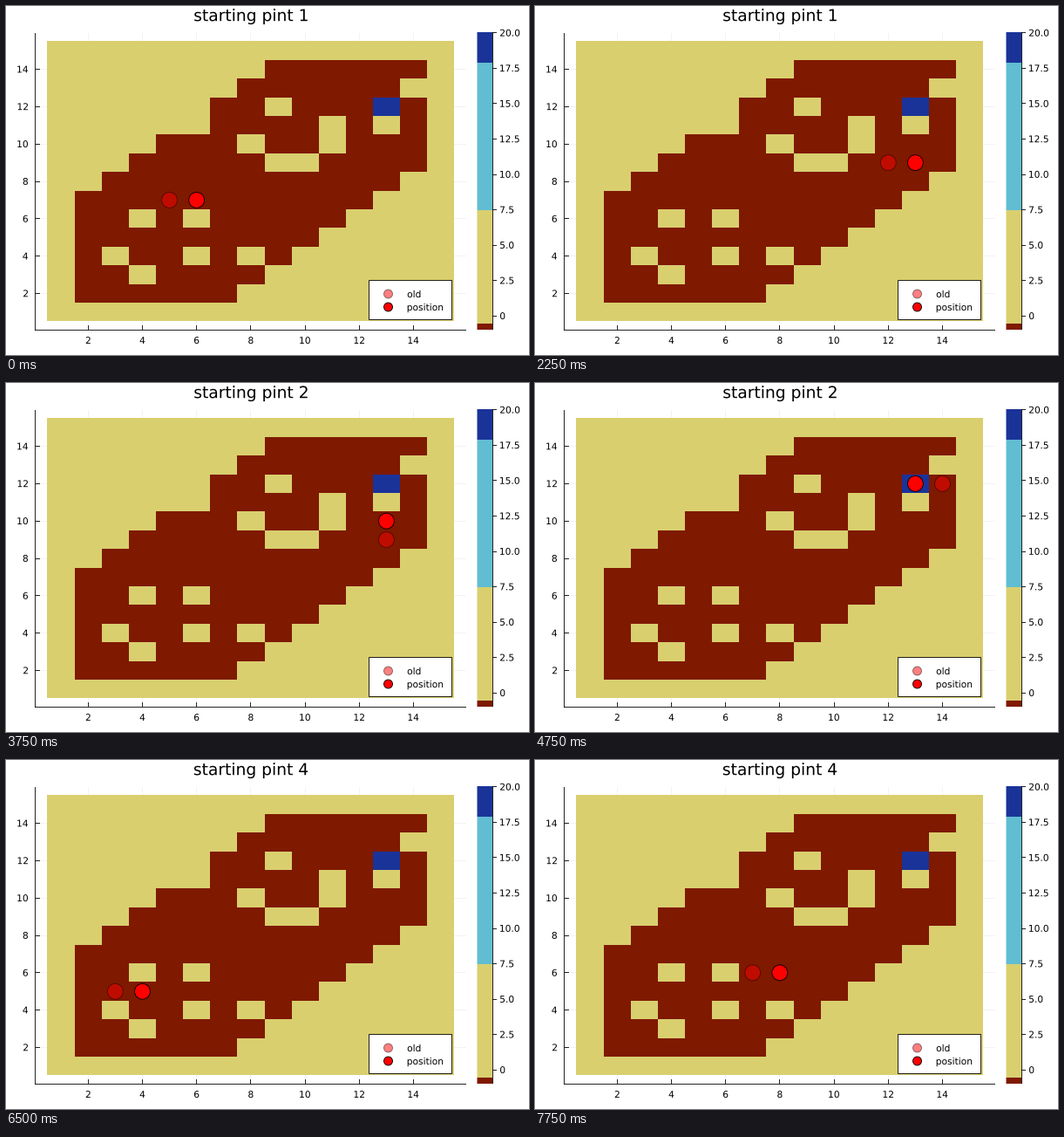
A matplotlib script that plays this animation: 600 px wide and 400 px high, repeating every 8000 ms.

```python
from math import floor

import matplotlib.pyplot as plt
from matplotlib.animation import FuncAnimation
from matplotlib.patches import Circle, PathPatch, Rectangle
from matplotlib.textpath import TextPath
from matplotlib.transforms import Affine2D

W, H, DPI = 600, 400, 100
PX = 72 / DPI  # points per pixel
BROWN, TAN, CYAN, BLUE = "#7f1900", "#d9cf6e", "#61bdd2", "#1a3399"
SMALL, LARGE = 10.67, 18.67
THIN = 0.85

# row: (first open column, last open column, walls between them)
ROWS = {
    2: (2, 7, ()), 3: (2, 8, (4,)), 4: (2, 9, (3, 6, 8)), 5: (2, 10, ()),
    6: (2, 11, (4, 6)), 7: (2, 12, ()), 8: (3, 13, ()), 9: (4, 14, (9, 10)),
    10: (5, 14, (8, 11)), 11: (7, 14, (11, 13)), 12: (7, 14, (9,)),
    13: (8, 13, ()), 14: (9, 14, ()),
}
GOAL = (13, 12)

# start cell and the moves of each run
RUNS = [
    ((5, 7), "RRRRRRRUURURUUL"),
    ((13, 9), "URUUL"),
    ((11, 13), "RRD"),
    ((2, 3), "UURRRRRUR"),
]
STEP = {"R": (1, 0), "L": (-1, 0), "U": (0, 1), "D": (0, -1)}

plt.rcParams["font.family"] = "DejaVu Sans"
fig = plt.figure(figsize=(W / DPI, H / DPI), dpi=DPI, facecolor="white")
ax = fig.add_axes([0, 0, 1, 1])
ax.set_xlim(0, W)
ax.set_ylim(H, 0)
ax.axis("off")


def cell_x(x):
    return 47.6 + 31.1 * (x - 0.5)


def cell_y(y):
    return 361.6 - 21.41 * (y - 0.5)


def edge_x(k):
    return round(47.4 + 31.138 * k)


def edge_y(k):
    return round(361.4 - 21.4 * k)


def middle(v):
    return floor(v) + 0.5


def box(x0, y0, x1, y1, color, **kw):
    kw = {"lw": 0, "snap": False, **kw}
    ax.add_patch(Rectangle((x0, y0), x1 - x0, y1 - y0, fc=color, **kw))


def cells(x0, x1, y0, y1, color):
    box(edge_x(x0 - 1), edge_y(y1), edge_x(x1), edge_y(y0 - 1), color, zorder=2)


def line(x0, y0, x1, y1, color="black", zorder=3):
    ax.plot([x0, x1], [y0, y1], color=color, lw=THIN * PX, zorder=zorder,
            solid_capstyle="butt", snap=False)


def text_path(x, y, text, size, align):
    """Outline of a text, its ink aligned at x (0 left, 0.5 centre, 1 right)."""
    path = TextPath((0, 0), text, size=size)
    ink = path.get_extents()
    shift = x - ink.x0 - align * ink.width
    return Affine2D().scale(1, -1).translate(shift, y).transform_path(path)


def label(x, y, text, size=SMALL, align=0):
    path = text_path(x, y, text, size, align)
    return ax.add_patch(PathPatch(path, fc="black", lw=0, snap=False, zorder=7))


def dot(x, y, r, alpha=1):
    return ax.add_patch(Circle((x, y), r, fc="red", ec="black", lw=THIN * PX,
                               alpha=alpha, zorder=6))


def draw_map():
    cells(1, 15, 1, 15, TAN)
    for y, (first, last, walls) in ROWS.items():
        cells(first, last, y, y, BROWN)
        for x in walls:
            cells(x, x, y, y, TAN)
    cells(GOAL[0], GOAL[0], GOAL[1], GOAL[1], BLUE)


def draw_axes():
    for v in range(2, 15, 2):
        x, y = middle(cell_x(v)), middle(cell_y(v))
        line(x, 31, x, 371, "#f0f0f0", 1)
        line(34, y, 528, y, "#f0f0f0", 1)
        line(x, 371, x, 366)
        line(34, y, 39, y)
        label(cell_x(v), 387, str(v), align=0.5)
        label(25, cell_y(v) + 3.8, str(v), align=1)
    line(33.5, 31, 33.5, 372)
    line(33, 371.5, 528, 371.5)


def draw_colorbar():
    stops = [30, 65, 234, 364, 371]
    for top, bottom, color in zip(stops, stops[1:], (BLUE, CYAN, TAN, BROWN)):
        box(540.5, top, 558, bottom, color)
    line(558.5, 30, 558.5, 371)
    for k in range(9):
        y = 355.2 - 40.55 * k
        line(558, middle(y), 563, middle(y))
        label(567, y + 3.8, f"{2.5 * k:.1f}" if k else "0")


def draw_legend():
    box(416.5, 314.5, 511.5, 359.5, "white", ec="black", lw=THIN * PX, zorder=5)
    for y, text, alpha in ((330, "old", 0.5), (345, "position", 1)):
        dot(438.5, y, 5, alpha)
        label(460.7, y + 4, text)


def title_path(run):
    return text_path(281, 17.2, f"starting pint {run}", LARGE, 0.5)


def walk():
    for run, ((x, y), moves) in enumerate(RUNS, 1):
        for move in moves:
            dx, dy = STEP[move]
            yield run, (x, y), (x + dx, y + dy)
            x, y = x + dx, y + dy


draw_map()
draw_axes()
draw_colorbar()
draw_legend()
title = ax.add_patch(PathPatch(title_path(1), fc="black", lw=0, snap=False))
old = dot(0, 0, 8.95, 0.5)
position = dot(0, 0, 8.95)
states = list(walk())


def update(i):
    run, before, now = states[i]
    title.set_path(title_path(run))
    for mark, (x, y) in ((old, before), (position, now)):
        mark.center = cell_x(x), cell_y(y)
    return title, old, position


anim = FuncAnimation(fig, update, frames=len(states), interval=250,
                     repeat=True, repeat_delay=0)
plt.show()
```
